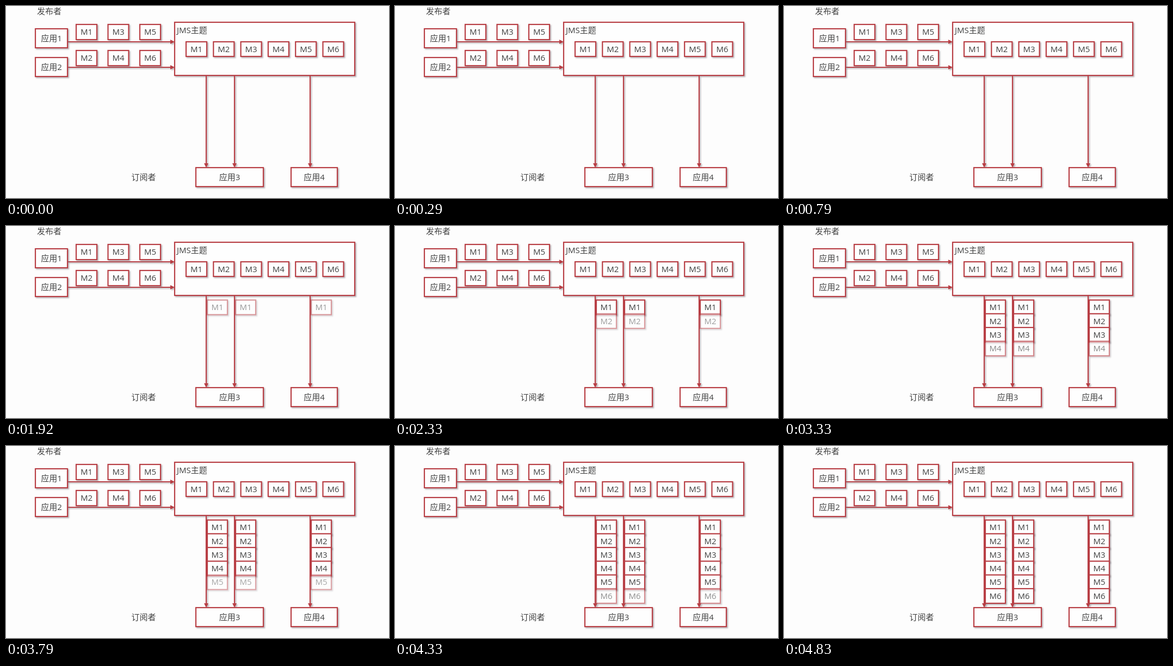
Recreate the animation shown at these times as an HTML page. Size 704 px wide and 354 px high, loop 4910 ms.

```html
<!DOCTYPE html>
<html lang="zh-CN">
<head>
<meta charset="utf-8">
<style>
  html, body { margin: 0; width: 100%; height: 100%; overflow: hidden; background: #fdfdfd; }
  svg { display: block; width: 704px; height: 354px; }
  g { filter: drop-shadow(2px 2px 1.3px #7a707880); }
  rect { fill: #fefefe; stroke: #b83f45; stroke-width: 2.2; }
  path { fill: none; stroke: #b83f45; stroke-width: 2.2; }
  path.head { fill: #b83f45; stroke: none; }
  text { font: 15px "Open Sans", "Noto Sans CJK SC", "Noto Sans CJK", sans-serif; fill: #404040; }
  .mid { text-anchor: middle; }
</style>
</head>
<body>
<svg id="stage" viewBox="0 0 704 354"></svg>
<script>
const LOOP = 4910, FADE = 280;
const STARTS = [1775, 2190, 2630, 3160, 3665, 4170];
const stage = document.getElementById('stage');

function add(tag, attrs, parent = stage, content = '') {
  const node = document.createElementNS('http://www.w3.org/2000/svg', tag);
  for (const key in attrs) node.setAttribute(key, attrs[key]);
  node.textContent = content;
  return parent.appendChild(node);
}

function label(x, y, content, parent, cls = '') {
  add('text', { x, y: y + 5.2, class: cls }, parent, content);
}

function box(x, y, width, height, content, parent = stage) {
  const group = add('g', {}, parent);
  add('rect', { x, y, width, height }, group);
  if (content) label(x + width / 2, y + height / 2, content, parent, 'mid');
}

function arrow(x, y, length, angle) {
  const group = add('g', {});
  const transform = `translate(${x} ${y}) rotate(${angle})`;
  add('path', { d: `M0 0H${length - 5}`, transform }, group);
  add('path', { d: `M${length} 0l-8-4v8z`, transform, class: 'head' }, group);
}

label(57, 10, '发布者');
label(230.5, 316, '订阅者');

arrow(113, 66, 197, 0);
arrow(113, 113, 197, 0);
box(54, 42, 59, 35, '应用1');
box(54, 95, 59, 35, '应用2');
for (let i = 0; i < 6; i++) {
  box(129 + 58.5 * (i >> 1), i % 2 ? 82 : 34, 38, 28, 'M' + (i + 1));
}

box(310, 30, 331, 98);
label(314, 45, 'JMS主题');
for (let i = 0; i < 6; i++) box(331 + 50.3 * i, 66, 38, 27, 'M' + (i + 1));

const columns = [368, 420, 559];
columns.forEach(x => arrow(x, 129, 169, 90));
box(349, 298, 124, 35, '应用3');
box(524, 298, 85, 35, '应用4');

// Each message reaches every subscriber at the same moment.
const messages = STARTS.map((start, i) => {
  const layer = add('svg', {});
  columns.forEach(x => box(x + 2, 136.5 + 25.3 * i, 37, 27, 'M' + (i + 1), layer));
  return layer;
});

function draw(now) {
  const t = now % LOOP;
  messages.forEach((layer, i) => {
    layer.style.opacity = Math.min(1, Math.max(0, (t - STARTS[i]) / FADE));
  });
  requestAnimationFrame(draw);
}
draw(performance.now());
</script>
</body>
</html>
```
